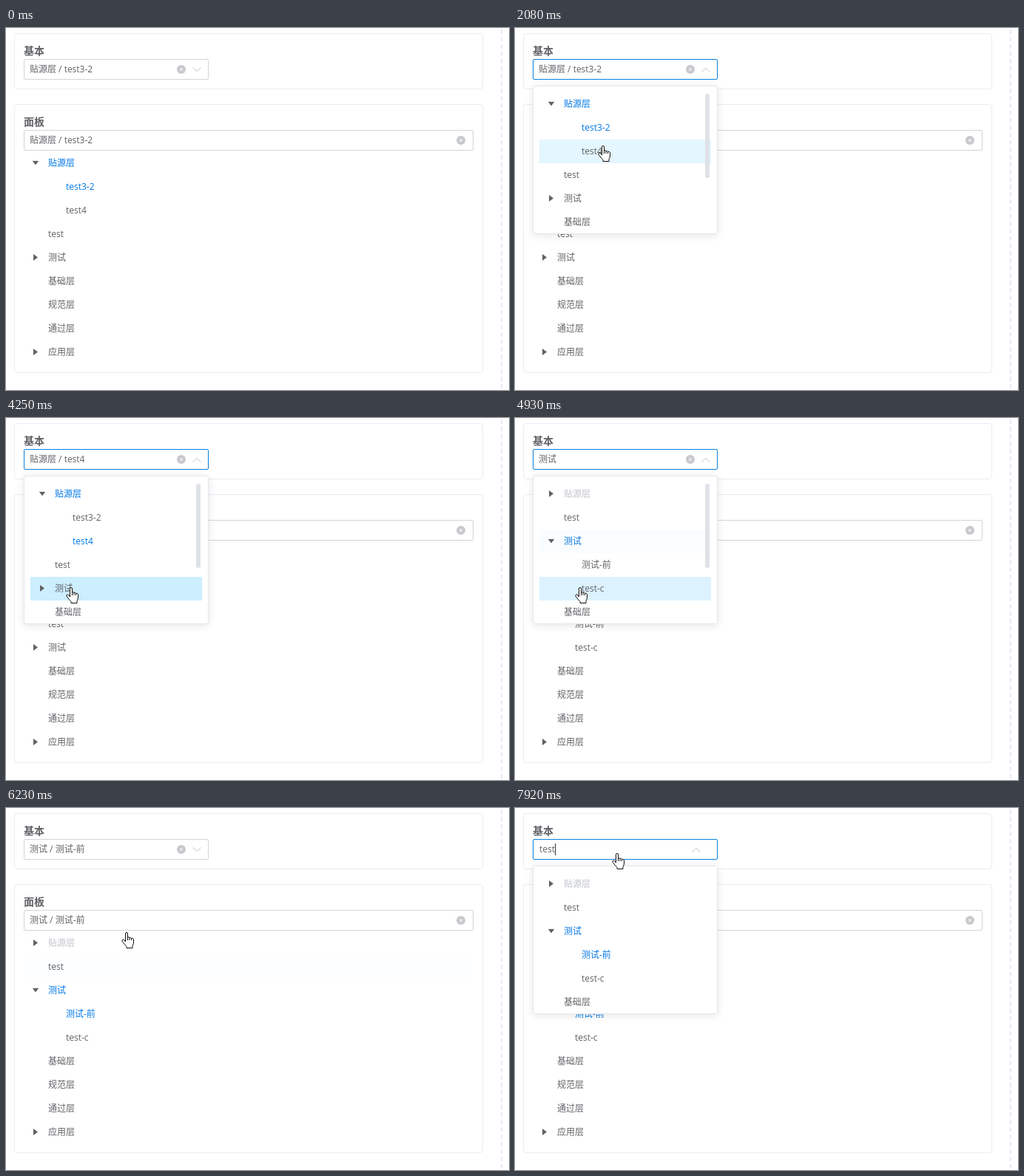
These frames come from a looping animation (680x490 px, 8000 ms). An HTML page:

```html
<!DOCTYPE html>
<html lang="zh-CN">
<head>
<meta charset="utf-8">
<title>级联选择</title>
<style>
html, body { margin: 0; width: 100%; height: 100%; overflow: hidden; background: #fff; }
body, .abs { position: absolute; box-sizing: border-box; }
body { font: 12px "Open Sans", "Noto Sans CJK SC", "Noto Sans CJK", sans-serif; color: #606266; }
.card { left: 11px; width: 634px; border: 1px solid #ebebf5; border-radius: 4px; }
.title { left: 12px; top: 13px; font-size: 14px; font-weight: bold; line-height: 20px; }
.input { left: 24px; height: 28px; border: 1px solid #d3d5da; border-radius: 2px; background: #fff; line-height: 26px; white-space: pre; }
.value { position: absolute; left: 7px; top: 0; }
.caret { top: 5px; width: 1px; height: 16px; background: #333; }
svg { position: absolute; overflow: visible; }
.row { position: relative; height: 32px; line-height: 32px; white-space: pre; }
.row span { position: absolute; left: 33px; }
.kids { overflow: hidden; }
.kids span { left: 57px; }
.mark { position: absolute; left: 13px; top: 11px; width: 6px; height: 9px; background: #606266; clip-path: polygon(0 0, 100% 50%, 0 100%); }
#panelList { position: relative; margin: 63px 12px 0; padding-bottom: 11px; }
#drop { left: 24px; top: 78px; width: 250px; height: 201px; border: 1px solid #e4e7ed; border-radius: 3px; background: #fff; box-shadow: 0 2px 12px rgba(0,0,0,.1); transform-origin: 50% 0; }
#dropList { left: 8px; top: 8px; width: 232px; height: 183px; overflow: hidden; }
#bar { left: 232px; top: 10px; width: 6px; height: 114px; border-radius: 3px; background: #dfe2e7; }
#edge { left: 669px; top: 2px; width: 2px; height: 488px; background: repeating-linear-gradient(#e8e8f8 0 6px, transparent 6px 10px); }
</style>
</head>
<body>
<div class="abs card" style="top:7px;height:76px"><div class="abs title">基本</div></div>
<div class="abs card" style="top:103px"><div class="abs title">面板</div><div id="panelList"></div></div>
<div class="abs input" id="panelInput" style="top:138px;width:608px"><span class="value"></span></div>
<div class="abs" id="edge"></div>
<div class="abs input" id="baseInput" style="top:42px;width:250px">
  <span class="value"></span><i class="abs caret" id="caret"></i>
  <svg id="chevron" width="12" height="6" style="top:10px"><path d="M.5 .5 6 5.5 11.5 .5" fill="none" stroke="#c0c4cc"/></svg>
</div>
<div class="abs" id="drop"><div class="abs" id="dropList"></div><div class="abs" id="bar"></div></div>
<svg id="hand" width="17" height="22" style="left:0;top:0">
  <path d="M5.5 13V2Q5.5.5 7 .5 8.5.5 8.5 2V7Q10 6 11 7.5 12.5 6.8 13.5 8.3 15 7.6 16.5 9.5V14Q16.5 16 15 18.5V21.5H7V19.5Q4 16.5.8 12 .8 10 2.5 10 4 10.3 5.5 13ZM8.5 7V11M11 7.5V11M13.5 8.3V11" fill="#fff" stroke="#111"/>
</svg>
<script>
const LOOP = 8000;
const $ = id => document.getElementById(id);
const clamp = v => Math.max(0, Math.min(1, v));
const ramp = (t, start, dur) => clamp((t - start) / dur);
const ease = (t, start, dur) => { const p = ramp(t, start, dur); return p * p * (3 - 2 * p); };

const NODES = [
  ["贴源层", "test3-2", "test4"], ["test"], ["测试", "测试-前", "test-c"],
  ["基础层"], ["规范层"], ["通过层"], ["应用层", ""]
];

// Screen updates: first time, last time, number of steps
const BURSTS = [
  [120, 900, 11], [1080, 1080, 1], [1300, 2080, 11], [2170, 2930, 10],
  [3000, 3790, 11], [3860, 4250, 6], [4550, 5290, 9], [5360, 5440, 2],
  [5660, 6460, 11], [6540, 7290, 11], [7380, 7380, 1], [7600, 7920, 5]
];
const VALUES = [
  [0, "贴源层 / test3-2"], [2170, "贴源层 / test4"], [4550, "测试"], [5660, "测试 / 测试-前"]
];
const TYPED = "test", TYPE_START = 7600, TYPE_STEP = 80;
// Highlighted label: start, end
const CHOSEN = [
  ["贴源层", -300, 4550], ["test3-2", -300, 2170], ["test4", 2170, 4550],
  ["测试", 4640, 9000], ["测试-前", 5660, 9000]
];
// List, label: start, end
const HOVERS = [
  ["drop", "test4", 1950, 2170], ["drop", "test4", 3860, 3930], ["drop", "test", 3930, 3990],
  ["drop", "测试", 3990, 4690], ["drop", "test-c", 4740, 5200], ["drop", "测试-前", 5220, 5700],
  ["panel", "test", 5890, 5980]
];
// Popup opens, closes
const OPENS = [[1230, 2170], [3180, 5680], [6750, 9000]];
// Fingertip: time, x, y
const PATH = [
  [120, 250, 377], [900, 140, 50], [1300, 140, 69], [1520, 140, 69], [2000, 118, 160],
  [2300, 118, 160], [2930, 125, 71], [3000, 125, 69], [3300, 124, 64], [3790, 110, 130],
  [4000, 87, 230], [4910, 87, 230], [5290, 92, 201], [5440, 99, 203], [5700, 99, 203],
  [6220, 162, 169], [6460, 152, 75], [6650, 148, 62], [7290, 137, 62]
];

function el(parent, tag, cls, text = "") {
  const node = document.createElement(tag);
  node.className = cls;
  node.textContent = text;
  return parent.appendChild(node);
}

function buildTree(parent, name) {
  const tree = { name, rows: [], groups: [] };
  const addRow = (box, label) => {
    const row = el(box, "div", "row");
    tree.rows.push({ label, row, text: el(row, "span", "", label) });
    return row;
  };
  for (const [label, ...kids] of NODES) {
    const row = addRow(parent, label);
    if (!kids.length) continue;
    const mark = el(row, "i", "mark"), box = el(parent, "div", "kids");
    kids.forEach(kid => addRow(box, kid));
    tree.groups.push({ label, mark, box, size: kids.length * 32 });
  }
  return tree;
}

function addClear(input, left) {
  input.insertAdjacentHTML("beforeend", `<svg class="clear" width="12" height="12" style="left:${left}px;top:7px">
    <circle cx="6" cy="6" r="6" fill="#c8c9cc"/><path d="M4 4 8 8M8 4 4 8" stroke="#fff"/></svg>`);
}

const base = $("baseInput"), panelInput = $("panelInput");
const baseValue = base.querySelector(".value"), panelValue = panelInput.querySelector(".value");
addClear(base, 206);
addClear(panelInput, 584);
const baseClear = base.querySelector(".clear");
const trees = [buildTree($("panelList"), "panel"), buildTree($("dropList"), "drop")];

function stepTime(t) {
  let shown = 0;
  for (const [start, end, count] of BURSTS) {
    if (t < start) break;
    const step = Math.floor((end - start) / Math.max(1, count - 1) / 10) * 10 || 1;
    shown = t >= end ? end : start + Math.floor((t - start) / step) * step;
  }
  return shown;
}

function mix(from, to, p) {
  return `rgb(${from.map((v, i) => Math.round(v + (to[i] - v) * p))})`;
}

function pulse(t, start, end, dur) {
  return ramp(t, start, dur) * (1 - ramp(t, end, dur));
}

function tip(t) {
  const i = PATH.findIndex(p => p[0] > t);
  if (i < 0) return PATH[PATH.length - 1].slice(1);
  if (i === 0) return PATH[0].slice(1);
  const a = PATH[i - 1], b = PATH[i], p = (t - a[0]) / (b[0] - a[0]);
  return [a[1] + (b[1] - a[1]) * p, a[2] + (b[2] - a[2]) * p];
}

function drawTree(tree, t) {
  const expanded = {
    "贴源层": (tree.name === "drop" ? ease(t, 1300, 250) : 1) * (1 - ease(t, 4560, 260)),
    "测试": ease(t, 4500, 260),
    "应用层": 0
  };
  for (const { label, mark, box, size } of tree.groups) {
    box.style.height = expanded[label] * size + "px";
    mark.style.transform = `rotate(${expanded[label] * 90}deg)`;
  }
  for (const { label, row, text } of tree.rows) {
    let blue = 0, hover = 0;
    for (const [key, start, end] of CHOSEN)
      if (key === label) blue = Math.max(blue, pulse(t, start, end, 300));
    for (const [list, key, start, end] of HOVERS)
      if (list === tree.name && key === label) hover = Math.max(hover, pulse(t, start, end, 250));
    const off = label === "贴源层" && t >= 4550;
    text.style.color = off ? "#c0c4cc" : mix([96, 98, 102], [0, 120, 230], blue);
    row.style.background = mix([255, 255, 255], [204, 238, 255], hover);
  }
}

function draw(time) {
  const t = stepTime(time);
  trees.forEach(tree => drawTree(tree, t));

  const value = VALUES.filter(v => v[0] <= t).pop()[1];
  const typing = t >= TYPE_START;
  const startCaret = t >= 1300 && t < 1600;
  panelValue.textContent = value;
  baseValue.textContent = typing ? TYPED.slice(0, 1 + Math.floor((t - TYPE_START) / TYPE_STEP)) : value;
  baseValue.style.left = (typing || startCaret ? 8 : 7) + "px";
  $("caret").style.display = typing || startCaret ? "block" : "none";
  $("caret").style.left = (typing ? 8 + baseValue.offsetWidth : 8) + "px";
  baseClear.style.display = typing ? "none" : "block";

  let open = 0;
  for (const [start, end] of OPENS) open = Math.max(open, ease(t, start, 210) * (1 - ease(t, end, 250)));
  const focused = t >= 1080 && t < 2170 || OPENS.some(([a, b]) => t >= a && t < b);
  base.style.borderColor = focused ? "#0a80dc" : "#d3d5da";
  base.style.boxShadow = t >= 1080 && t < 1600 ? "0 0 3px rgba(10,128,220,.4)" : "none";
  $("chevron").style.left = (typing ? 214 : 227) + "px";
  $("chevron").style.transform = `translateY(${open}px) rotate(${open * 180}deg)`;

  const drop = $("drop");
  drop.style.visibility = open > 0 ? "visible" : "hidden";
  drop.style.opacity = open;
  drop.style.transform = open > .99 ? "none" : `scaleY(${open})`;

  const [x, y] = tip(t);
  const over = y > 79 && x < 274;
  $("bar").style.opacity = over ? 1 : 0;
  $("hand").style.display = t < 120 ? "none" : "block";
  $("hand").style.transform = `translate(${Math.round(x) - 6}px, ${Math.round(y) - 1}px)`;
}

const began = performance.now();
function tick() {
  draw((performance.now() - began) % LOOP);
  requestAnimationFrame(tick);
}
tick();
</script>
</body>
</html>
```
